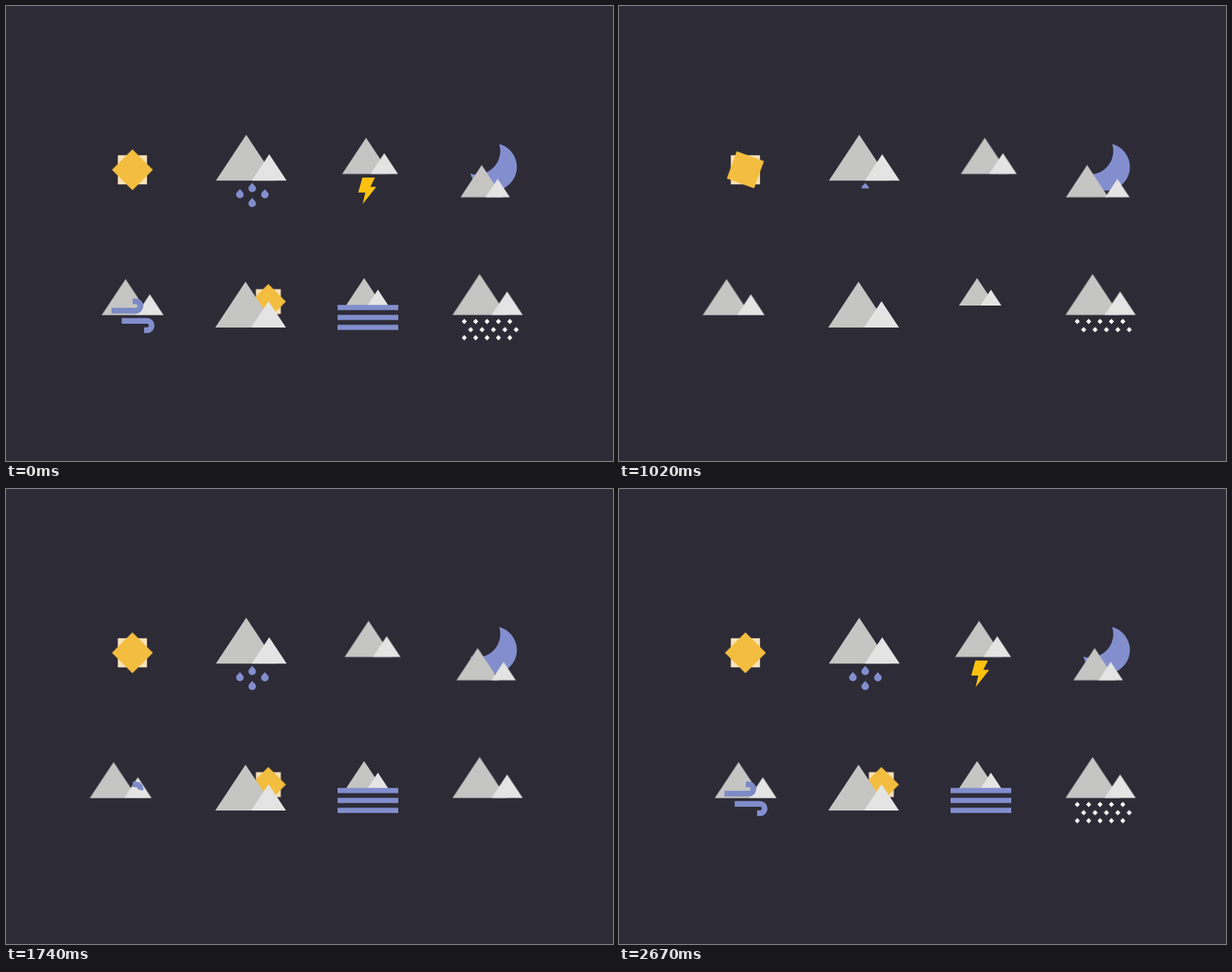
Write an HTML page without scripts that moves like this. It is 800x600 px and loops after 2.7 s.

```html
<!DOCTYPE html>
<html lang="en">
<head>
<meta charset="utf-8">
<title>Weather icons</title>
<style>
  html, body { margin: 0; width: 100%; height: 100%; overflow: hidden; background: #2d2b36; }
  svg { display: block; width: 800px; height: 600px; }

  .anim, .beam, .ray { animation: 2.7s linear infinite; }
  .big { fill: #c5c5c3; }
  .small { fill: #e4e4e4; }
  .pale { fill: #f8e2b8; }
  .gold { fill: #f3bd3f; }
  .blue { fill: #828ecd; }
  .beam, .ray { stroke-width: 5; stroke-linecap: round; }

  /* Sun */
  .turn { animation-name: turn; animation-timing-function: ease-in-out; }
  @keyframes turn {
    0%, 30.9% { transform: rotate(45deg); }
    41.8%, 82% { transform: rotate(135deg); }
    97%, 100% { transform: rotate(45deg); }
  }
  .beam { animation-name: beam; }
  @keyframes beam {
    0%, 1.1% { stroke-dasharray: 12 99; stroke-dashoffset: -2; opacity: 1; }
    1.11%, 42.2% { stroke-dasharray: 0 99; stroke-dashoffset: -8; opacity: 0; }
    42.21% { stroke-dasharray: 0 99; stroke-dashoffset: -8; opacity: 1; }
    51.1% { stroke-dasharray: 15.5 99; stroke-dashoffset: -.25; }
    56.7% { stroke-dasharray: 11.5 99; stroke-dashoffset: -2.25; }
    60% { stroke-dasharray: 8 99; stroke-dashoffset: -4; }
    64.4%, 66.6% { stroke-dasharray: 0 99; stroke-dashoffset: -8; opacity: 1; }
    66.61%, 100% { stroke-dasharray: 0 99; stroke-dashoffset: -8; opacity: 0; }
  }

  /* Rain */
  .wipe { animation-name: wipe; }
  @keyframes wipe {
    0%, 2% { transform: translateY(33px); }
    18%, 29% { transform: none; }
    37.8% { transform: translateY(7.5px); }
    56.7% { transform: translateY(24px); }
    64.4%, 100% { transform: translateY(33px); }
  }

  /* Thunder */
  .shake { animation-name: shake; animation-timing-function: ease-in-out; }
  @keyframes shake {
    0%, 30% { transform: none; }
    37.8% { transform: translateX(7.5px); }
    44.4% { transform: translateX(-7.5px); }
    51% { transform: translateX(5px); }
    56.7% { transform: translateX(-4px); }
    64.4% { transform: translateX(3.2px); }
    69%, 100% { transform: none; }
  }
  .strike { animation-name: strike; }
  @keyframes strike {
    0%, 2% { transform: none; }
    14%, 71% { transform: scale(0); }
    75.6%, 76.7% { transform: scale(1.4); }
    82%, 100% { transform: none; }
  }

  /* Moon */
  .left { animation-name: left; }
  @keyframes left {
    0%, 100% { transform: none; }
    22.2% { transform: translateX(-5.6px); }
    37.8% { transform: translateX(-10px); }
    41% { transform: translateX(-10.2px); }
    56.7% { transform: translateX(-7px); }
    76.7% { transform: translateX(-2.8px); }
  }
  .right { animation-name: right; }
  @keyframes right {
    0%, 98%, 100% { transform: none; }
    22.2% { transform: translateX(3.3px); }
    37.8% { transform: translateX(8.8px); }
    47.2% { transform: translateX(11px); }
    56.7% { transform: translateX(9.8px); }
    64.4% { transform: translateX(7.8px); }
    76.7% { transform: translateX(4.2px); }
  }

  /* Wind */
  .drift { animation-name: drift; animation-timing-function: ease-in-out; }
  @keyframes drift {
    0%, 23.3% { transform: none; }
    36.7%, 68.9% { transform: translateX(-15.8px); }
    84.4%, 100% { transform: none; }
  }
  .gust {
    fill: none; stroke: #828ecd; stroke-width: 7.5; stroke-dasharray: 1 2;
    animation-timing-function: ease-in-out;
  }
  .upper { stroke: #7c8ac6; animation-name: upper; }
  .lower { animation-name: lower; }
  @keyframes upper {
    0%, 23.3% { stroke-dashoffset: 0; }
    35%, 58.9% { stroke-dashoffset: 1; }
    74.4%, 100% { stroke-dashoffset: 0; }
  }
  @keyframes lower {
    0%, 24% { stroke-dashoffset: 0; }
    36.7%, 68.9% { stroke-dashoffset: 1; }
    84.4%, 100% { stroke-dashoffset: 0; }
  }

  /* Sun behind the peaks */
  .rise { animation-name: rise; animation-timing-function: ease-in-out; }
  @keyframes rise {
    0%, 2% { transform: translate(345.7px, 389.8px); }
    9% { transform: translate(334.5px, 377.7px) scale(.88); }
    17%, 46% { transform: translate(314px, 402px) scale(.5); }
    56.7% { transform: translate(334.5px, 377.7px) scale(.88); }
    63.5%, 100% { transform: translate(345.7px, 389.8px); }
  }
  .ray { animation-name: ray; }
  @keyframes ray {
    0%, 62% { transform: translateX(16px) scale(0); }
    62.1% { transform: translateX(14px); }
    64.4% { transform: translateX(19px); }
    76.7% { transform: translateX(42.3px); }
    83%, 100% { transform: translateX(48px) scale(0); }
  }

  /* Fog */
  .bar { animation-name: bar; animation-timing-function: ease-in-out; }
  .bar:nth-of-type(2) { transform-origin: 80px 0; }
  @keyframes bar {
    0%, 2% { transform: none; }
    19%, 40% { transform: scaleX(0); }
    55%, 100% { transform: none; }
  }

  /* Snow: rows switch in turn, twice per loop */
  .row { animation-name: row; animation-duration: 1.35s; fill: #fff; }
  .row:nth-of-type(2) { animation-delay: -1.23s; }
  .row:nth-of-type(3) { animation-delay: -1.11s; }
  @keyframes row {
    0%, 8.8% { opacity: 1; }
    8.9%, 60% { opacity: 0; }
    66%, 100% { opacity: 1; }
  }
</style>
</head>
<body>
<svg viewBox="0 0 800 600">
  <defs>
    <path id="big" class="big" d="M-40 0L0-60.5 40 0Z"/>
    <path id="small" class="small" d="M-23 0L0-34.8 23 0Z"/>
    <g id="peaks"><use href="#big"/><use href="#small" x="30.3"/></g>
    <g id="wide-peaks"><use href="#big"/><use href="#small" x="40.6"/></g>
    <path id="beam" class="beam" d="M37 0H53"/>
    <path id="ray" class="ray" d="M-2.4 0H2.4"/>
    <path id="drop" class="blue" d="M0-6C1.8-3.4 5-1.6 5 1.2A5 5 0 0 1-5 1.2C-5-1.6-1.8-3.4 0-6Z"/>
    <path id="flake" d="M0-3.4L3.4 0 0 3.4-3.4 0Z"/>
    <g id="flakes">
      <use href="#flake"/><use href="#flake" x="15"/><use href="#flake" x="30"/>
      <use href="#flake" x="45"/><use href="#flake" x="60"/>
    </g>
  </defs>

  <g transform="translate(166.6 216)">
    <rect class="pale" x="-19.2" y="-19.2" width="38.4" height="38.4"/>
    <rect class="gold anim turn" x="-19.1" y="-19.1" width="38.2" height="38.2"/>
    <use href="#beam" stroke="#ecb440"/>
    <use href="#beam" stroke="#f3bb3f" transform="rotate(45)"/>
    <use href="#beam" stroke="#f3bb3f" transform="rotate(90)"/>
    <use href="#beam" stroke="#cf9c3e" transform="rotate(135)"/>
    <use href="#beam" stroke="#d4a03e" transform="rotate(180)"/>
    <use href="#beam" stroke="#e0aa40" transform="rotate(225)"/>
    <use href="#beam" stroke="#e6af40" transform="rotate(270)"/>
    <use href="#beam" stroke="#e8b140" transform="rotate(315)"/>
  </g>

  <g>
    <use href="#drop" x="324.5" y="239.2"/>
    <use href="#drop" x="308.3" y="247.2"/>
    <use href="#drop" x="341.2" y="247.5"/>
    <use href="#drop" x="324.5" y="259"/>
    <rect class="anim wipe" x="300" y="233" width="50" height="34" fill="#2d2b36"/>
    <use href="#peaks" transform="translate(316.6 230.2)"/>
  </g>

  <g class="anim shake"><use href="#peaks" transform="translate(474.6 221.5) scale(.79)"/></g>
  <g transform="translate(476 244)">
    <path class="anim strike" fill="#fdc20f" d="M-6.3-17.7H10.3L4.2-5.4H12L-6 17.2-2.4 2H-11.8Z"/>
  </g>

  <path class="blue" d="M650 182A31.3 31.3 0 1 1 612 221A31 31 0 0 0 650 182Z"/>
  <g class="anim left"><use href="#big" transform="translate(627 252.2) scale(.7)"/></g>
  <g class="anim right"><use href="#small" transform="translate(648 252.2) scale(.7)"/></g>

  <g class="anim drift"><use href="#wide-peaks" transform="translate(157.6 407.6) scale(.787)"/></g>
  <path class="anim gust upper" pathLength="1" d="M167 389.4H171A6.2 6.2 0 0 1 171 401.8H139"/>
  <path class="anim gust lower" pathLength="1" d="M182 427.6H185.8A6.2 6.2 0 0 0 185.8 415.2H152.5"/>

  <g transform="translate(345.7 389.8)" stroke="#ecb53f">
    <use href="#ray" transform="rotate(-108)"/>
    <use href="#ray" transform="rotate(-60)"/>
    <use href="#ray" transform="rotate(-12)"/>
    <use href="#ray" transform="rotate(35)"/>
  </g>
  <g class="anim rise">
    <rect class="pale" x="-16.4" y="-16.4" width="32.8" height="32.8"/>
    <rect class="gold" x="-16.4" y="-16.4" width="32.8" height="32.8" transform="rotate(45)"/>
  </g>
  <use href="#peaks" transform="translate(315.7 424)"/>

  <use href="#peaks" transform="translate(472 395) scale(.6)"/>
  <g class="blue" transform="translate(437 394.2)">
    <rect class="anim bar" width="80" height="6.8"/>
    <rect class="anim bar" y="13.1" width="80" height="6.8"/>
    <rect class="anim bar" y="26.2" width="80" height="6.8"/>
  </g>

  <use href="#wide-peaks" transform="translate(624.2 407.4) scale(.893)"/>
  <g>
    <use class="anim row" href="#flakes" x="604" y="416"/>
    <use class="anim row" href="#flakes" x="612.4" y="426.8"/>
    <use class="anim row" href="#flakes" x="604" y="437.4"/>
  </g>
</svg>
</body>
</html>
```
